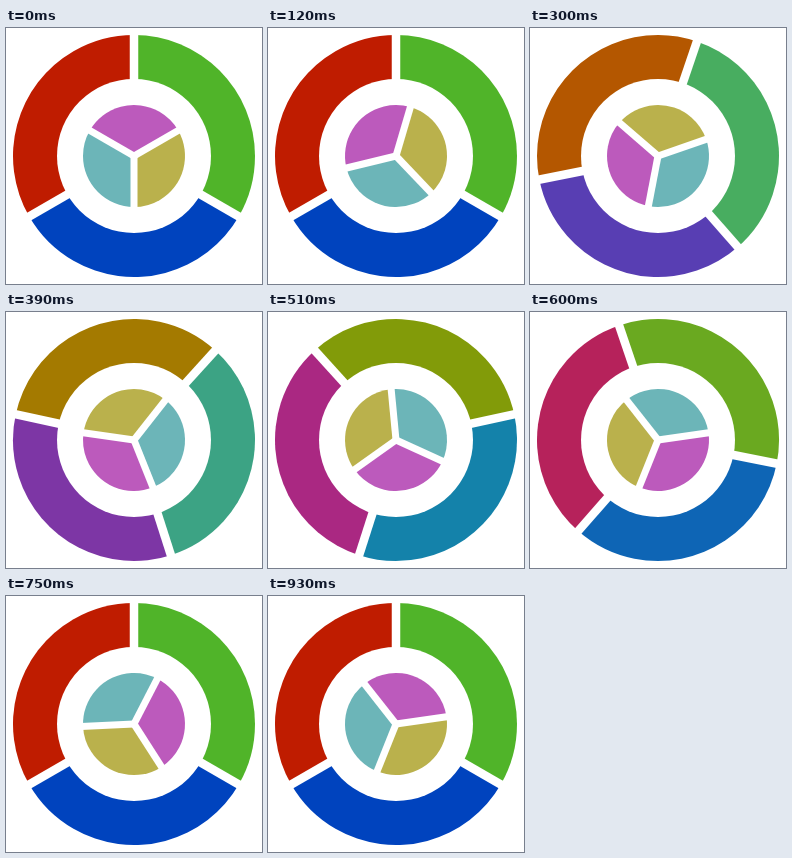
Animation, 256 px wide and 256 px high, one loop 0.96 s. Source, as an HTML page with a canvas:

```html
<!DOCTYPE html>
<html lang="en">
<head>
<meta charset="utf-8">
<title>Rotating rings</title>
<style>
  html, body { margin: 0; width: 100%; height: 100%; overflow: hidden; background: #fff; }
  canvas { display: block; width: 256px; height: 256px; }
</style>
</head>
<body>
<canvas id="stage" width="256" height="256"></canvas>
<script>
const ctx = document.getElementById('stage').getContext('2d');
const LOOP = 960, STEP = 30, CENTER = 128;
const DEG = Math.PI / 180;

// Colour wheel: red, green and blue with two steps between each pair
const WHEEL = [
  [191, 28, 0], [164, 122, 0], [130, 155, 9],
  [80, 180, 41], [60, 163, 132], [20, 130, 170],
  [0, 67, 190], [125, 54, 165], [170, 40, 130]
];
const STOPS = [0, 0.352, 0.648, 1];
const DISC = ['#bc5abc', '#bab14c', '#6cb5b8'];

const clamp = x => Math.min(1, Math.max(0, x));
const smooth = x => x * x * (3 - 2 * x);

// Mix two colours in linear light
function mix(a, b, k) {
  const gamma = 2.3;
  const channels = a.map((v, i) =>
    Math.round(((1 - k) * v ** gamma + k * b[i] ** gamma) ** (1 / gamma)));
  return `rgb(${channels})`;
}

function wheelColor(base, progress) {
  const i = progress < STOPS[1] ? 0 : progress < STOPS[2] ? 1 : 2;
  const k = (progress - STOPS[i]) / (STOPS[i + 1] - STOPS[i]);
  const at = base * 3 + i;
  return mix(WHEEL[at % 9], WHEEL[(at + 1) % 9], k);
}

function circle(radius, color) {
  ctx.beginPath();
  ctx.arc(0, 0, radius, 0, 2 * Math.PI);
  ctx.fillStyle = color;
  ctx.fill();
}

// Three equal sectors, the first starting at `start` degrees clockwise from the top
function pie(radius, start, colors, gap) {
  ctx.save();
  ctx.rotate((start - 90) * DEG);
  colors.forEach((color, i) => {
    ctx.beginPath();
    ctx.moveTo(0, 0);
    ctx.arc(0, 0, radius, i * 120 * DEG, (i + 1) * 120 * DEG);
    ctx.fillStyle = color;
    ctx.fill();
  });
  ctx.fillStyle = '#fff';
  for (let i = 0; i < 3; i++) {
    ctx.fillRect(0, -gap / 2, radius + 2, gap);
    ctx.rotate(120 * DEG);
  }
  ctx.restore();
}

function draw(time) {
  const t = Math.floor((time % LOOP) / STEP) * STEP;
  const progress = smooth(clamp((t - 150) / 600));
  const ring = [1, 2, 0].map(base => wheelColor(base, progress));

  ctx.setTransform(1, 0, 0, 1, 0, 0);
  ctx.fillStyle = '#fff';
  ctx.fillRect(0, 0, 256, 256);
  ctx.translate(CENTER, CENTER);
  pie(121, 120 * progress, ring, 8.5);
  circle(77, '#fff');
  pie(51, -60 - t / 990 * 360, DISC, 7);
}

const begin = performance.now();
function tick() {
  draw(performance.now() - begin);
  requestAnimationFrame(tick);
}
tick();
</script>
</body>
</html>
```
